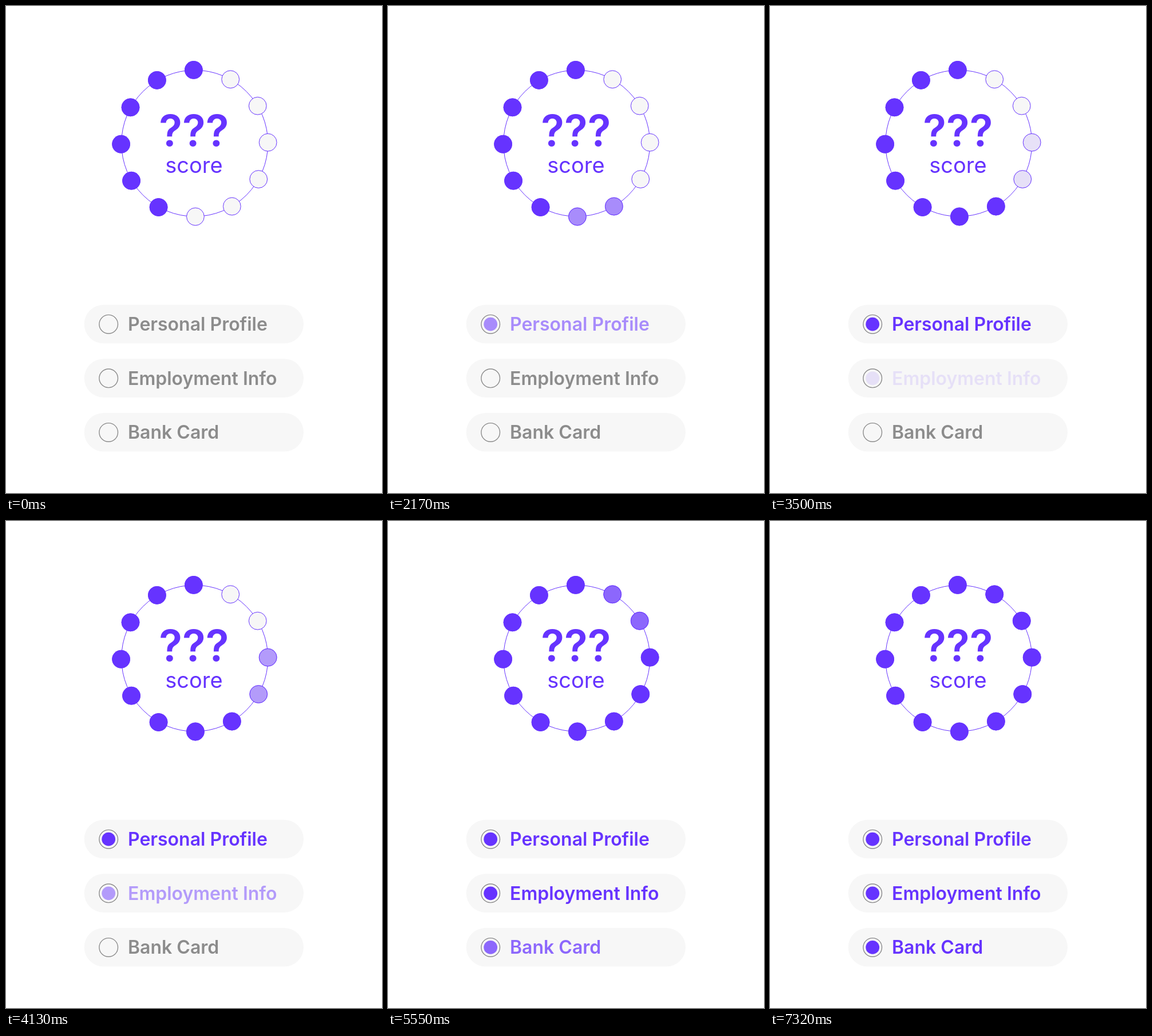
These frames come from a looping animation (657 px wide and 852 px high, 9.35 s). An HTML page:

```html
<!DOCTYPE html>
<html lang="en">
<head>
<meta charset="utf-8">
<title>Score progress</title>
<style>
  html, body { margin: 0; width: 100%; height: 100%; overflow: hidden; background: #fff; }
  svg { display: block; width: 657px; height: 852px; }
  text { font-family: Inter, "Open Sans", sans-serif; fill: #63f; }
  .marks { font-size: 75px; font-weight: 600; text-anchor: middle; }
  .caption { font-size: 38px; text-anchor: middle; }
  .label { font-size: 32px; font-weight: 600; }
  .orbit { fill: none; stroke: #63f; }
  .socket { fill: #f7f7f7; stroke: #63f; }
  .pill { fill: #f7f7f7; }
  .radio { fill: none; stroke: #8c8c8c; stroke-width: 1.4; }
  .dot { fill: #63f; }
  .idle { fill: #8c8c8c; }
</style>
</head>
<body>
<svg viewBox="0 0 657 852">
  <circle class="orbit" cx="329.7" cy="240.2" r="128"/>
  <g id="base"></g>
  <g id="lights"></g>
  <text class="marks" x="328.3" y="245">???</text>
  <text class="caption" x="328.5" y="292">score</text>
</svg>
<script>
const LOOP = 9350, FIRST = 370, PITCH = 2440, STEP = 30;
const BLINK = 2070, EASE_SPAN = 2250;
const base = document.getElementById('base');
const lights = document.getElementById('lights');
const labels = ['Personal Profile', 'Employment Info', 'Bank Card'];

function add(parent, tag, attrs, text) {
  const el = document.createElementNS('http://www.w3.org/2000/svg', tag);
  for (const key in attrs) el.setAttribute(key, attrs[key]);
  if (text) el.textContent = text;
  return parent.appendChild(el);
}

const stages = labels.map((label, i) => {
  const y = 556.5 + i * 94.6;
  add(base, 'rect', { class: 'pill', x: 136.7, y: y - 33.8, width: 383.3, height: 67.6, rx: 33.8 });
  add(base, 'circle', { class: 'radio', cx: 179.2, cy: y + 0.2, r: 16.3 });
  const place = { x: 213, y: y + 11.5 };
  const idle = add(base, 'text', { class: 'label idle', ...place }, label);
  const active = add(lights, 'g', {});
  add(active, 'circle', { class: 'dot', cx: 179.2, cy: y + 0.2, r: 11.9 });
  add(active, 'text', { class: 'label', ...place }, label);
  return { idle, active };
});

// Clockwise from the top: six sockets fill in pairs, from the bottom back up.
for (let k = 0; k < 12; k++) {
  const angle = (k * 30 - 90.68) * Math.PI / 180;
  const spot = { cx: 329.4 + 128.3 * Math.cos(angle), cy: 240.2 + 128.3 * Math.sin(angle) };
  const open = k >= 1 && k <= 6;
  add(base, 'circle', { class: 'socket', r: 15.4, ...spot });
  const layer = open ? stages[Math.floor((6 - k) / 2)].active : base;
  add(layer, 'circle', { class: 'dot', r: 15.9, ...spot });
}

// Two blinks with eased time, ending fully lit.
function blink(t) {
  if (t >= BLINK) return 1;
  const p = t / EASE_SPAN;
  const s = p - 0.09 * Math.sin(2 * Math.PI * p);
  return Math.abs(1 - 4 * (s % 0.5));
}

function draw(now) {
  const time = now % LOOP;
  stages.forEach(({ idle, active }, i) => {
    const t = Math.floor((time - FIRST - i * PITCH) / STEP) * STEP;
    idle.setAttribute('opacity', t < 0 ? 1 : 0);
    active.setAttribute('opacity', t < 0 ? 0 : blink(t));
  });
}

function tick() {
  draw(performance.now());
  requestAnimationFrame(tick);
}
tick();
</script>
</body>
</html>
```
